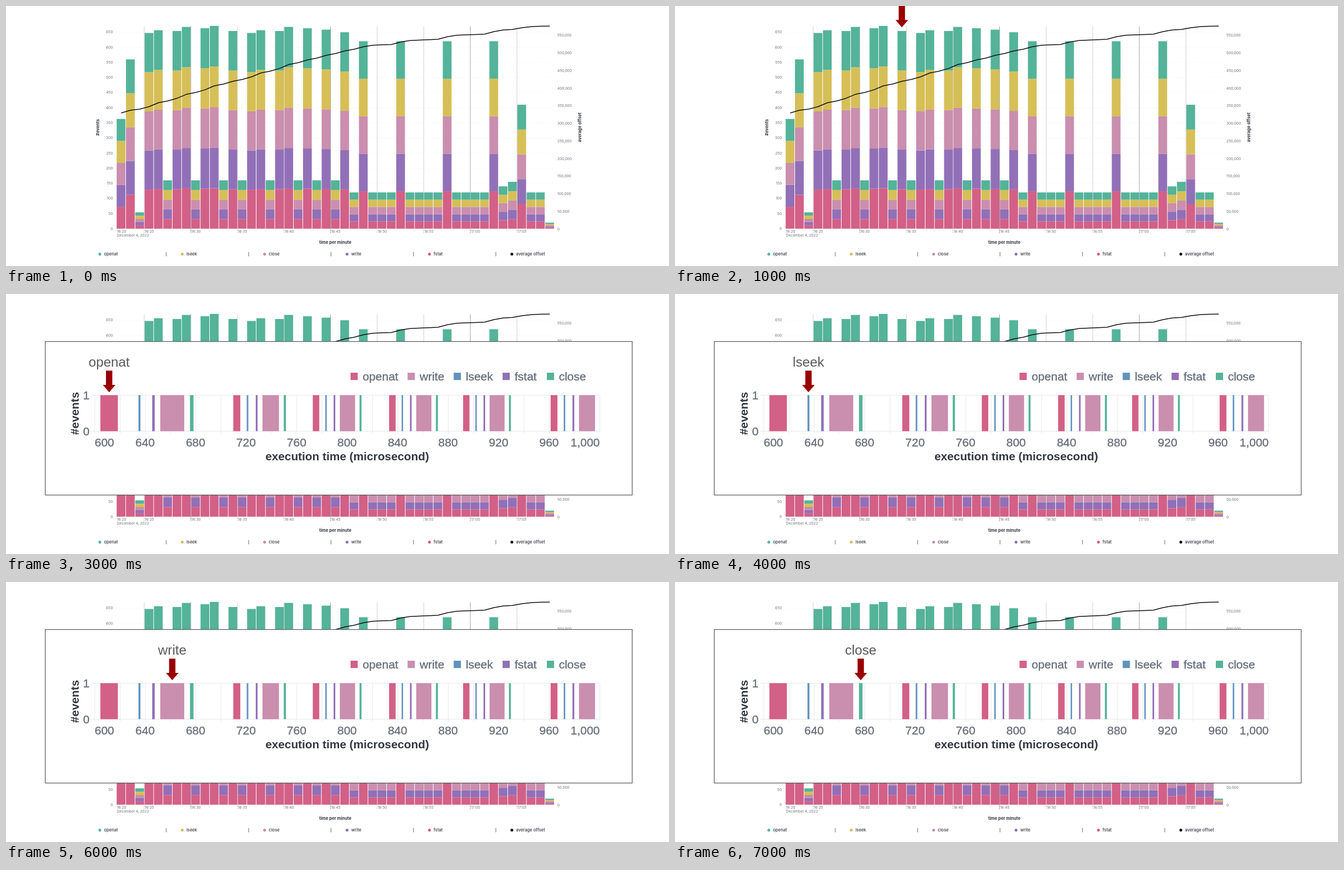
Animation, 1194 px wide and 469 px high, one loop 8000 ms. Source, as an HTML page:

```html
<!DOCTYPE html>
<html lang="en">
<head>
<meta charset="utf-8">
<title>System calls over time</title>
<style>
  html, body { margin: 0; width: 100%; height: 100%; overflow: hidden; background: #fff; }
  svg { display: block; width: 100vw; height: 100vh; }
  .small { font: 6.5px Inter, sans-serif; fill: #69707d; }
  .title { font: bold 7.6px Inter, sans-serif; fill: #343741; }
  .key { font: 500 7.6px Inter, sans-serif; fill: #343741; }
  .big { font: 21px "Liberation Sans", sans-serif; fill: #69707d; stroke: #69707d; stroke-width: .4; }
  .bold { font: bold 20.8px "Liberation Sans", sans-serif; fill: #343741; }
  .call { font: 24.2px "Liberation Sans", sans-serif; fill: #595959; }
</style>
</head>
<body>
<svg id="stage" viewBox="0 0 1194 469"></svg>
<script>
const NS = 'http://www.w3.org/2000/svg';
const GREEN = '#54b399', YELLOW = '#d6bf57', PINK = '#ca8eae',
  PURPLE = '#9170b8', RED = '#d36086', BLUE = '#6092c0';
const LOOP = 8000;
const stage = document.getElementById('stage');

function add(parent, tag, attrs) {
  const node = document.createElementNS(NS, tag);
  for (const name in attrs) node.setAttribute(name, attrs[name]);
  return parent.appendChild(node);
}
const group = () => add(stage, 'g', {});
const rect = (g, x, y, width, height, fill, more) =>
  add(g, 'rect', { x, y, width, height, fill, ...more });
const line = (g, x1, y1, x2, y2, stroke, more) =>
  add(g, 'line', { x1, y1, x2, y2, stroke, ...more });
function text(g, x, y, string, cls, anchor = 'start', turned = false) {
  const node = add(g, 'text', { x, y, class: cls, 'text-anchor': anchor });
  if (turned) node.setAttribute('transform', `rotate(-90 ${x} ${y})`);
  node.textContent = string;
  return node;
}
// Arrow pointing down with its tip at the origin
const arrow = g => add(g, 'path', {
  d: 'M-5.7-39H5.7V-13.2H11.3L0 0L-11.3-13.2H-5.7Z', fill: '#990000'
});

// Events per minute: # is a busy minute, - a quiet one, between a ramp up and a ramp down
function eventTotals() {
  const minutes = '##-##-##-#-##-##-#-#-#-#---#----#----#';
  const body = [...minutes].map((kind, i) => {
    const early = i < 22;
    if (kind === '-') return early ? 160 : 120;
    const wave = 8 * Math.cos((i - 6) * 2 * Math.PI / 11);
    return early ? 655 + wave + (minutes[i - 1] === '#' ? 9 : 0) : 620;
  });
  return [363, 560, 54, ...body, 140, 155, 410, 120, 120, 20];
}

// The average offset climbs with the events of this minute and the one before
function offsetCurve(totals) {
  let sum = 0;
  const climb = totals.map((total, i) =>
    i ? sum += Math.max(total + .55 * totals[i - 1] - 94, 40) : 0);
  return climb.map(c => 193 - 156.7 * c / sum);
}

function drawOverview(g) {
  const left = 199, pitch = 16.78, base = 401.7, scale = .5454;
  for (let v = 0; v <= 650; v += 50) {
    const y = base - v * scale;
    line(g, left, y, 987, y, '#f0f1f4', { 'stroke-dasharray': '2 2', 'stroke-width': .7 });
    text(g, 192.3, y + 2.2, v, 'small', 'end');
  }
  for (let i = 0; i <= 11; i++)
    text(g, 993, 404.8 - i * 31.77, (i * 50000).toLocaleString('en-US'), 'small');
  for (let i = 0; i < 9; i++) {
    const x = 248.9 + i * pitch * 5, minute = 25 + i * 5;
    line(g, x, 36.5, x, 410, i % 3 === 1 ? '#a3a3a3' : '#d0d0d0');
    const label = `${16 + Math.floor(minute / 60)}:${String(minute % 60).padStart(2, '0')}`;
    text(g, x + 1.2, 409.2, label, 'small');
  }
  text(g, 200, 409.2, '16:20', 'small');
  text(g, 200, 415.6, 'December 4, 2022', 'small');

  const totals = eventTotals();
  totals.forEach((total, i) => {
    const h = total * scale / 5;
    [RED, PURPLE, PINK, YELLOW, GREEN].forEach((color, k) =>
      rect(g, left + i * pitch + .3, base - h * (k + 1), pitch - 1, h, color));
  });
  add(g, 'polyline', {
    points: offsetCurve(totals).map((y, i) => [left + (i + .5) * pitch, y]).join(' '),
    fill: 'none', stroke: '#111', 'stroke-width': 1.5, 'stroke-linejoin': 'round'
  });

  text(g, 168, 219, '#events', 'title', 'middle', true);
  text(g, 1036.3, 219, 'average offset', 'title', 'middle', true);
  text(g, 593, 429.3, 'time per minute', 'title', 'middle');

  const keys = [['openat', GREEN], ['lseek', YELLOW], ['close', PINK], ['write', PURPLE],
    ['fstat', RED], ['average offset', '#111']];
  keys.forEach(([name, fill], i) => {
    const x = 169 + i * 148.4;
    add(g, 'circle', { cx: x, cy: 447.6, r: 2.6, fill });
    text(g, x + 7.5, 450.1, name, 'key');
    if (i < keys.length - 1)
      for (const dy of [-2.6, 0, 2.6]) rect(g, x + 118.8, 447 + dy, 1.5, 1.5, '#555');
  });
}

// Delay and length of each call: in the slow first cycle, then in the later ones
const calls = [
  { name: 'openat', color: RED, keyX: 620.5, first: [0, 31.5], later: [0, 11.7] },
  { name: 'lseek', color: BLUE, keyX: 806.3, first: [68.6, 3.5], later: [22.5, 2.6] },
  { name: 'fstat', color: PURPLE, keyX: 894.3, first: [93.3, 4.5], later: [37.5, 3] },
  { name: 'write', color: PINK, keyX: 723.3, first: [107.8, 43.2], later: [48.7, 27.5] },
  { name: 'close', color: GREEN, keyX: 974, first: [161.3, 6.4], later: [84.2, 3.6] }
];
const FIRST_X = 170;

function drawDetail(g) {
  const top = 182.5, bottom = 247.5, right = 1069.5;
  rect(g, 70.7, 85.7, 1057, 276.9, '#fff', { stroke: '#555', 'stroke-width': 1.2 });
  for (let i = 0; i <= 20; i++) {
    const x = 160 + i * 45.47;
    line(g, x, top, x, 252, '#e6e8ed');
  }
  for (const y of [top, bottom]) line(g, 153, y, right, y, '#e6e8ed');

  const block = (x, width, color) => {
    if (x < right - 10) rect(g, x, top, width, bottom - top, color);
  };
  // Start and pace of every later cycle
  const cycles = [[409.3, 1.08], [552.5, 1], [690, 1], [823.2, .98], [980.8, 1.05]];
  for (const { name, color, keyX, first, later } of calls) {
    block(FIRST_X + first[0], first[1], color);
    for (const [x, pace] of cycles) block(x + later[0] * pace, later[1] * pace, color);
    rect(g, keyX, 142, 13, 13.2, color);
    text(g, keyX + 21.7, 155.5, name, 'big');
  }

  text(g, 150.5, 190, '1', 'big', 'end');
  text(g, 150.5, 255, '0', 'big', 'end');
  text(g, 177.3, 275, '600', 'big', 'middle');
  for (let i = 0; i < 9; i++)
    text(g, 250.5 + i * 90.94, 275, 640 + i * 40, 'big', 'middle');
  text(g, 1043, 275, '1,000', 'big', 'middle');
  text(g, 614.5, 300.3, 'execution time (microsecond)', 'bold', 'middle');
  text(g, 130.5, 215.5, '#events', 'bold', 'middle', true);
}

drawOverview(group());
const marker = group();
marker.setAttribute('transform', 'translate(408.5 38.5)');
arrow(marker);
const detail = group();
drawDetail(detail);
const pointer = group();
arrow(pointer);
const caption = text(pointer, 0, -46.3, '', 'call', 'middle');

const show = (node, on) => node.setAttribute('visibility', on ? 'visible' : 'hidden');

function render(ms) {
  const second = Math.floor(ms % LOOP / 1000);
  const call = calls[second - 3];
  show(marker, second === 1);
  show(detail, second >= 2);
  show(pointer, call);
  if (call) {
    const [delay, length] = call.first;
    caption.textContent = call.name;
    pointer.setAttribute('transform', `translate(${FIRST_X + delay + length / 2} 177.2)`);
  }
}

const start = performance.now();
function tick() {
  render(performance.now() - start);
  requestAnimationFrame(tick);
}
tick();
</script>
</body>
</html>
```
